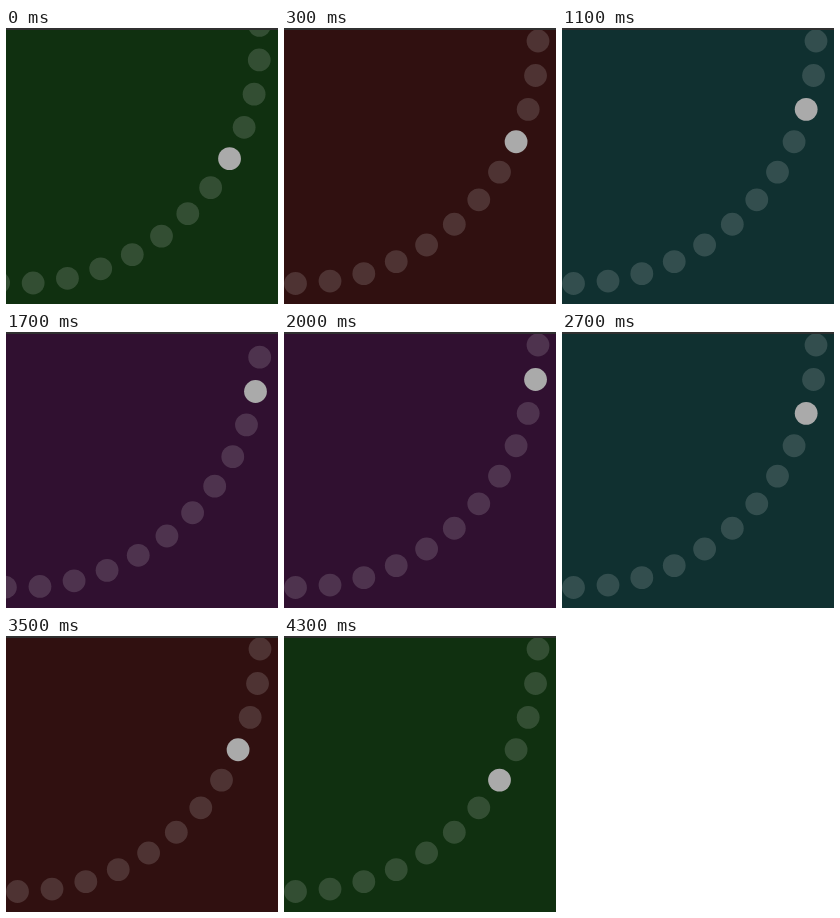
Recreate the animation shown at these times as an HTML page with a canvas. Size 272x276 px, loop 4800 ms.

```html
<!DOCTYPE html>
<html>
<head>
<meta charset="utf-8">
<title>Dial</title>
<style>
html, body { margin: 0; width: 100%; height: 100%; overflow: hidden; background: #103010; }
canvas { display: block; }
</style>
</head>
<body>
<canvas id="stage" width="272" height="276"></canvas>
<script>
const W = 272, H = 276;
const LOOP = 4800, SLOT = 800, TICK = 100;
const CX = 11.5, CY = 13, RING = 242.5, DOT = 11.4;
const COUNT = 44, STEP = Math.PI * 2 / COUNT;

// Selected position along the ring after each turn
const stops = [3, 2, 1, 2, 3, 4];
const colors = { 1: '#301030', 2: '#103030', 3: '#301010', 4: '#103010' };

const ctx = document.getElementById('stage').getContext('2d');
const ratio = window.devicePixelRatio || 1;
ctx.canvas.width = W * ratio;
ctx.canvas.height = H * ratio;
ctx.canvas.style.width = W + 'px';
ctx.canvas.style.height = H + 'px';

const easeOut = u => 1 - (1 - u) * (1 - u);

function position(ms) {
  const t = Math.floor(ms % LOOP / TICK) * TICK;
  const slot = Math.floor(t / SLOT);
  const from = stops[(slot + stops.length - 1) % stops.length];
  const to = stops[slot];
  const duration = slot === 2 ? 500 : 400;
  const u = Math.min(1, (t % SLOT + 104) / duration);
  return from + (to - from) * easeOut(u);
}

function dot(place, fill) {
  const a = place * STEP;
  ctx.fillStyle = fill;
  ctx.beginPath();
  ctx.arc(CX + RING * Math.cos(a), CY + RING * Math.sin(a), DOT, 0, Math.PI * 2);
  ctx.fill();
}

function draw(ms) {
  const pos = position(ms);
  ctx.setTransform(ratio, 0, 0, ratio, 0, 0);
  ctx.fillStyle = colors[Math.round(pos)];
  ctx.fillRect(0, 0, W, H);
  for (let i = 1; i < COUNT; i++) dot(pos + i, 'rgba(255,255,255,0.15)');
  dot(pos, '#aaa');
  ctx.fillStyle = '#303030';
  ctx.fillRect(0, 0, W, 2);
}

const start = performance.now();
function frame() {
  draw(performance.now() - start);
  requestAnimationFrame(frame);
}
frame();
</script>
</body>
</html>
```
